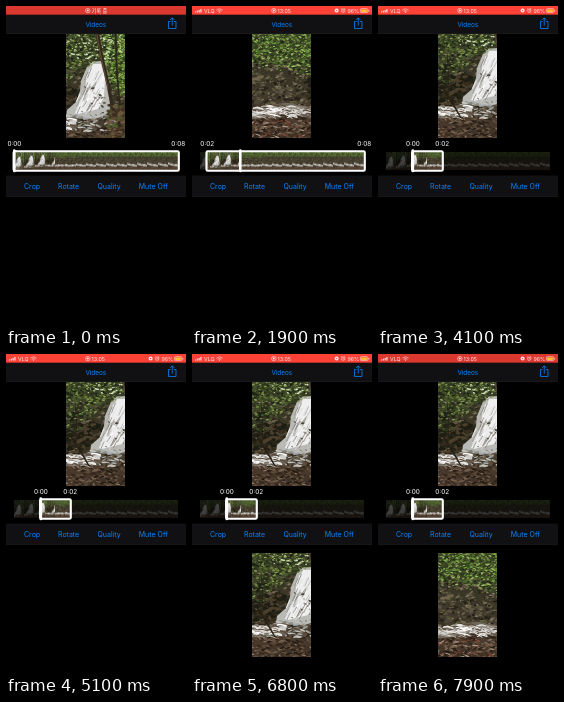
An HTML page with a canvas that plays this animation: 180x320 px, repeating every 8000 ms.

```html
<!DOCTYPE html>
<html lang="en">
<head>
<meta charset="utf-8">
<title>Video trimmer</title>
<style>
  html, body { margin: 0; width: 100%; height: 100%; overflow: hidden; background: #000; }
  canvas, svg { position: absolute; left: 0; top: 0; width: 180px; height: 320px; }
  text { font: 7px Inter, Roboto, sans-serif; }
  .mid { text-anchor: middle; }
  .tint { fill: #0a84ff; }
  .white, .status text { fill: #fff; }
  .small { font-size: 6.4px; }
  .status { opacity: .9; }
  .status text { font-size: 5.3px; }
  .status .ko { font-family: "Noto Sans CJK KR", "Noto Sans CJK", sans-serif; }
  .line { fill: none; stroke: #fff; stroke-width: .6; }
</style>
</head>
<body>
<canvas id="film" width="180" height="320"></canvas>
<svg viewBox="0 0 180 320">
  <path fill="#111113" d="M0 8.7H180V27.8H0ZM0 169.5H180V190.5H0Z"/>
  <path fill="#262628" d="M0 27.3H180V27.8H0ZM0 190H180V190.5H0Z"/>
  <rect id="bar" width="180" height="8.7" fill="#ff4238"/>

  <text class="tint mid small" x="89.8" y="20.5">Videos</text>
  <g fill="none" stroke="#0a84ff" stroke-width=".8">
    <path d="M164.5 15.5H162.5V22.5H170V15.5H168"/>
    <path d="M166.25 19.5V12M164.2 13.9L166.25 11.8L168.3 13.9"/>
  </g>
  <text class="tint" x="18" y="182.6">Crop</text>
  <text class="tint" x="52" y="182.6">Rotate</text>
  <text class="tint" x="91.5" y="182.6">Quality</text>
  <text class="tint" x="132.8" y="182.6">Mute Off</text>

  <g class="status">
    <circle class="line" cx="81.8" cy="4.6" r="2.2"/>
    <circle class="white" cx="81.8" cy="4.6" r="1"/>
  </g>
  <g class="status" id="recording">
    <text class="ko" x="85.5" y="6.6">기록 중</text>
  </g>

  <g class="status" id="phone">
    <path class="white" d="M3 6.5V5.5H4.1V6.5ZM4.8 6.5V4.8H5.9V6.5ZM6.6 6.5V3.9H7.7V6.5ZM8.4 6.5V3H9.5V6.5Z"/>
    <text x="12" y="6.5">VLQ</text>
    <path class="line" stroke-width=".9" d="M24.4 4.1Q27.5 1.5 30.6 4.1M25.7 5.3Q27.5 3.8 29.3 5.3"/>
    <circle class="white" cx="27.5" cy="6.1" r=".7"/>
    <text x="85.5" y="6.5">13:05</text>
    <circle class="white" cx="144.6" cy="4.6" r="2"/>
    <circle cx="144.6" cy="4.6" r=".7" fill="#ff4238"/>
    <circle class="line" cx="151.2" cy="4.7" r="1.7"/>
    <path class="line" d="M151.2 3.7V4.8H152M149.1 3.2L150 2.4M152.4 2.4L153.3 3.2"/>
    <text x="155.5" y="6.5">96%</text>
    <rect class="line" x="168.4" y="2.7" width="7.4" height="3.9" rx="1"/>
    <rect x="169.1" y="3.4" width="5.8" height="2.5" rx=".4" fill="#ffcf33"/>
    <path class="white" d="M176.5 3.9H177.2V5.4H176.5Z"/>
  </g>

  <text class="white mid small" id="now" y="140.3"></text>
  <text class="white mid small" id="length" y="140.3"></text>
  <rect id="frame" y="145.2" height="19.6" rx="1.4" fill="none" stroke="#fff" stroke-width="2.1"/>
  <rect id="head" y="143.3" width="2.6" height="23" rx="1.2" fill="#fff"/>
</svg>

<script>
const LOOP = 8000, STEP = 100, DURATION = 8.4;
const STRIP = { x: 8, y: 146, w: 164, h: 18, thumbs: 16 };
const VIEW = { w: 59, h: 104 };
const WORLD = { x: -175, y: -20, w: 285, h: 130 };

const $ = id => document.getElementById(id);
const smooth = p => p * p * (3 - 2 * p);

// Piecewise value through [position, value] pairs
function along(keys, pos, ease = p => p) {
  if (pos <= keys[0][0]) return keys[0][1];
  for (let i = 1; i < keys.length; i++) {
    const [a, from] = keys[i - 1], [b, to] = keys[i];
    if (pos < b) return from + (to - from) * ease((pos - a) / (b - a));
  }
  return keys[keys.length - 1][1];
}

let seed = 41;
const rand = (lo = 0, hi = 1) => {
  seed = (seed * 16807) % 2147483647;
  return lo + (hi - lo) * seed / 2147483647;
};
const pick = list => list[Math.floor(rand(0, list.length))];

function paintWorld() {
  const canvas = document.createElement('canvas');
  canvas.width = WORLD.w;
  canvas.height = WORLD.h;
  const c = canvas.getContext('2d');
  c.translate(-WORLD.x, -WORLD.y);

  const dabs = (n, [x0, x1], [y0, y1], colors, size, flat = .5, keep = () => true) => {
    for (let i = 0; i < n; i++) {
      const x = rand(x0, x1), y = rand(y0, y1), r = rand(size * .4, size);
      const color = pick(colors), turn = rand(-.6, .6);
      if (!keep(x, y)) continue;
      c.fillStyle = color;
      c.beginPath();
      c.ellipse(x, y, r, r * flat, turn, 0, 7);
      c.fill();
    }
  };
  const shape = (color, points) => {
    c.fillStyle = color;
    c.beginPath();
    points.forEach(([x, y]) => c.lineTo(x, y));
    c.fill();
  };
  const stroke = (color, width, path) => {
    c.strokeStyle = color;
    c.lineWidth = width;
    c.stroke(new Path2D(path));
  };

  const base = c.createLinearGradient(0, -20, 0, 110);
  [[0, '#3c4826'], [.4, '#363524'], [.6, '#40392c'], [.82, '#4a3c2e'], [1, '#372a20']]
    .forEach(s => base.addColorStop(...s));
  c.fillStyle = base;
  c.fillRect(WORLD.x, WORLD.y, WORLD.w, WORLD.h);

  const all = [WORLD.x, WORLD.x + WORLD.w];
  dabs(1100, all, [20, 76], ['#5d5443', '#3b3427', '#70664f', '#2a251b', '#4d4636'], 3.4);
  dabs(700, all, [24, 74], ['#857a63', '#1d1a13', '#4c5230', '#615a3a'], 1.6, .6);
  dabs(200, [-5, 34], [42, 74], ['#262318', '#352d1e', '#4b3f2b', '#1d1d13'], 4);
  dabs(900, all, [80, 110], ['#5d4938', '#463528', '#33271d', '#75604e', '#241c15'], 4, .3);
  dabs(350, all, [82, 110], ['#8d7a68', '#6c5c47', '#2a2119'], 2.2, .35);
  dabs(80, [-110, -5], [86, 106], ['#8a5746', '#b09a8c', '#74402f'], 3.5, .22);

  // Waterfall, narrow at the top and fanning out to the left
  shape('#b9bab5', [[47, 15], [60, 14], [67, 30], [68, 64], [58, 72], [24, 71],
    [25, 63], [34, 55], [38, 44], [39, 34]]);
  shape('#eeeeef', [[51, 17], [59, 17], [63, 32], [62, 50], [56, 62], [32, 68], [37, 57], [43, 45], [44, 34]]);
  for (let i = 0; i < 60; i++) {
    const y = rand(20, 60), x = 54 - (y - 20) * .3 + rand(-9, 12);
    stroke(pick(['#fff', '#a9a9a4', '#dededd', '#87837a']), .8, `M${x} ${y}q-2 4 -4 ${rand(5, 10)}`);
  }
  dabs(24, [36, 64], [38, 68], ['#6d675a', '#8d8a80', '#4b4538'], 2);
  dabs(90, [22, 75], [68, 84], ['#c2c2bd', '#8f8c80', '#5a5143', '#a5abb0'], 3.5, .3);

  // Stream
  const bed = 'M-180 44C-150 54 -100 82 -66 80S-35 71 -18 76S10 78 34 75';
  stroke('#6f675b', 11, bed);
  stroke('#cfcecb', 4.5, bed);
  const ripple = (n, x0, x1, rise) => {
    for (let i = 0; i < n; i++) {
      const x = rand(x0, x1), y = 79 + rise * Math.min(0, x + 66) + rand(-7, 5);
      stroke(pick(['#fff', '#e4e3df', '#8f867b', '#5b4c3e']), rand(.6, 1.5),
        `M${x} ${y}q3 ${rise ? 0 : -2} ${rand(5, 11)} ${rise ? 3 : 1}`);
    }
  };
  ripple(130, -66, 25, 0);
  ripple(110, -170, -66, .24);

  // Foliage hangs down to an uneven edge
  const edge = [[-170, 26], [-90, 28], [-62, 28], [-8, 38], [10, 48], [28, 38],
    [40, 20], [60, 10], [70, 42], [100, 58]];
  const hangs = (x, y) => y < along(edge, x) + rand(-9, 4);
  const olive = ['#5d6d33', '#74853f', '#46542a', '#8c9b56', '#333d20', '#20271a'];
  const lush = ['#6b9638', '#86ad4c', '#4d7429', '#a0bf6c', '#2f4a1c'];
  dabs(2200, all, [-22, 60], ['#2a351c', '#3c4a26', '#1d2415', '#4a5630'], 3.2, .5, hangs);
  dabs(5000, all, [-22, 60], olive, 1.8, .45, hangs);
  dabs(2400, [WORLD.x, -4], [-22, 50], lush, 1.8, .45, hangs);
  dabs(1300, [62, 110], [-22, 60], lush, 1.8, .45, hangs);
  dabs(200, [20, 100], [-22, 12], ['#c4d3a4', '#a7c47a', '#d9e0cb'], 1.4, .6);

  // Trees
  stroke('#34291d', 3.4, 'M55 -20C56 0 64 25 67 42S72 66 80 84');
  stroke('#6a5a45', .8, 'M54.4 -20C55.4 0 63 25 66 42');
  stroke('#2d261a', 1.8, 'M74 -20Q73 20 79 66');
  stroke('#241f15', 1.4, 'M3 52Q13 66 23 84');
  stroke('#2a2317', 1, 'M9 20Q12 42 10 66');
  dabs(200, [66, 105], [58, 92], ['#54432f', '#3d3122', '#6b573c', '#4d5a2a'], 3.4);
  return canvas;
}

const world = paintWorld();
const film = $('film').getContext('2d');
film.imageSmoothingQuality = 'high';

const PAN_X = [[0, 24], [.6, 12], [1.36, 0], [1.6, -19], [2.05, -62], [2.4, -70], [3, -108], [8.4, -128]];
const PAN_Y = [[0, -13], [.6, -6], [1.36, 0]];

function shot(sec, x, y, w = VIEW.w, h = VIEW.h, ctx = film) {
  const px = Math.round(along(PAN_X, sec)), py = Math.round(along(PAN_Y, sec));
  ctx.drawImage(world, px - WORLD.x, py - WORLD.y, VIEW.w, VIEW.h, x, y, w, h);
}

const strip = document.createElement('canvas');
strip.width = STRIP.w;
strip.height = STRIP.h;
{
  const ctx = strip.getContext('2d');
  ctx.imageSmoothingQuality = 'high';
  const w = STRIP.w / STRIP.thumbs;
  for (let i = 0; i < STRIP.thumbs; i++) shot(i / STRIP.thumbs * DURATION, i * w, 0, w, STRIP.h, ctx);
}

const HEAD = [[300, 8], [1000, 48], [3800, 48], [3900, 34.5]];
const LEFT = [[1600, 8], [2500, 34.5]];
const RIGHT = [[2900, 172], [3800, 64]];
const GLOW = [[0, .86], [300, 1], [7400, 1], [7900, .86]];
const RECORDING_END = 1900, PREVIEW_IN = 6400, PREVIEW_PLAY = 7050;

const seconds = px => px / STRIP.w * DURATION;
const label = sec => '0:0' + Math.round(Math.max(0, sec));
const show = (id, on) => $(id).style.display = on ? '' : 'none';

function setLabel(id, x, sec) {
  $(id).setAttribute('x', x);
  $(id).textContent = label(sec);
}

function draw(ms) {
  const left = along(LEFT, ms, smooth), right = along(RIGHT, ms, smooth);
  const head = Math.max(left, along(HEAD, ms, smooth));

  film.clearRect(0, 0, 180, 320);
  shot(seconds(head - STRIP.x), 60, 28);
  film.drawImage(strip, STRIP.x, STRIP.y);
  film.fillStyle = 'rgba(0,0,0,.7)';
  film.fillRect(STRIP.x, STRIP.y, left - STRIP.x, STRIP.h);
  film.fillRect(right, STRIP.y, STRIP.x + STRIP.w - right, STRIP.h);
  if (ms >= PREVIEW_IN) {
    shot(seconds(left - STRIP.x) + Math.max(0, ms - PREVIEW_PLAY) / 1000, 60, 199);
  }

  $('frame').setAttribute('x', left - .4);
  $('frame').setAttribute('width', right - left + 1.2);
  $('head').setAttribute('x', head - 1);
  setLabel('now', left + .4, seconds(head - left));
  setLabel('length', right + .2, seconds(right - left));

  show('recording', ms < RECORDING_END);
  show('phone', ms >= RECORDING_END);
  $('bar').style.opacity = along(GLOW, ms);
}

const start = performance.now();
function tick() {
  const ms = (performance.now() - start) % LOOP;
  draw(Math.floor(ms / STEP) * STEP);
  requestAnimationFrame(tick);
}
tick();
</script>
</body>
</html>
```
